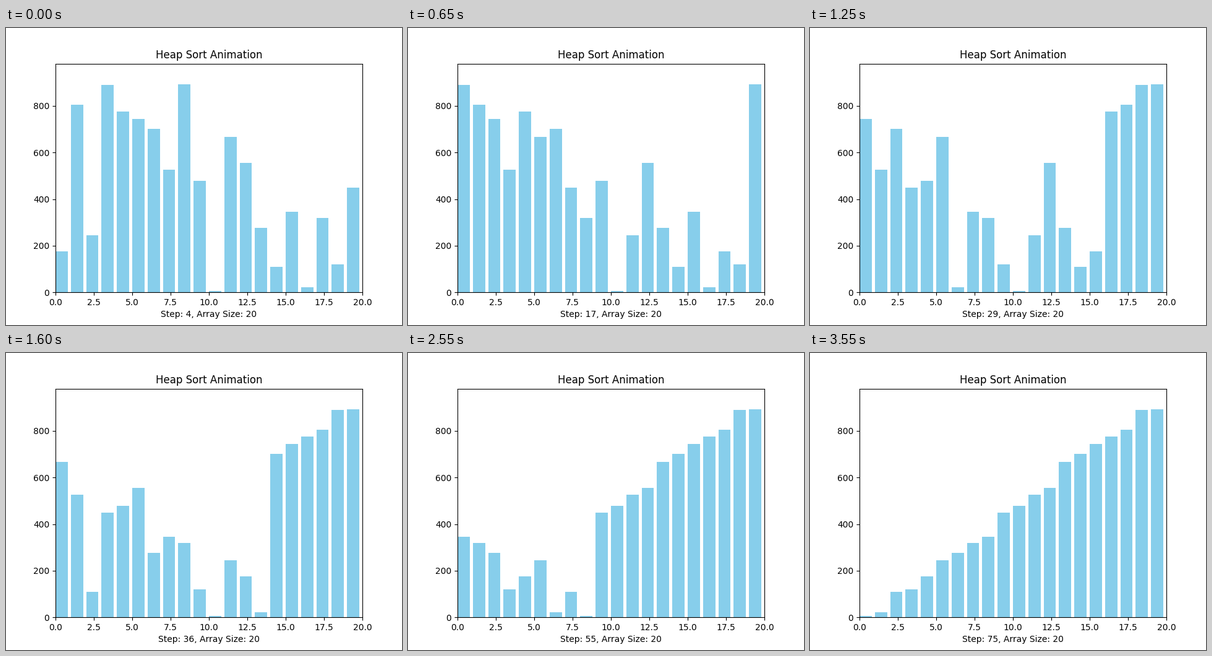
These frames come from a looping animation (640 by 480 pixels, 8 s). A matplotlib script:

```python
import matplotlib.pyplot as plt
from matplotlib.animation import FuncAnimation

VALUES = [175, 805, 244, 890, 776, 744, 702, 527, 892, 478,
          5, 667, 555, 276, 109, 346, 22, 319, 120, 450]
FIRST_STEP = 4
INTERVAL = 50
FRAMES = 160


def sift_down(arr, n, i):
    """Restore the heap below i, yielding after each swap."""
    while True:
        children = [c for c in (2 * i + 1, 2 * i + 2) if c < n]
        largest = max([i] + children, key=lambda k: arr[k])
        if largest == i:
            return
        arr[i], arr[largest] = arr[largest], arr[i]
        yield arr[:]
        i = largest


def heap_sort(values):
    arr = list(values)
    n = len(arr)
    yield arr[:]
    for i in range(n // 2 - 1, -1, -1):
        yield from sift_down(arr, n, i)
    for end in range(n - 1, 0, -1):
        arr[0], arr[end] = arr[end], arr[0]
        yield arr[:]
        yield from sift_down(arr, end, 0)


states = list(heap_sort(VALUES))
size = len(VALUES)

plt.rcParams["font.family"] = "DejaVu Sans"
fig, ax = plt.subplots(figsize=(6.4, 4.8), dpi=100)
bars = ax.bar(range(size), VALUES, align="edge", color="skyblue")
ax.set_xlim(0, size)
ax.set_ylim(0, 1.1 * max(VALUES))
ax.set_title("Heap Sort Animation")
label = ax.set_xlabel("")


def update(frame):
    k = min(frame, len(states) - 1)
    for bar, value in zip(bars, states[k]):
        bar.set_height(value)
    label.set_text(f"Step: {FIRST_STEP + k}, Array Size: {size}")
    return [*bars, label]


anim = FuncAnimation(fig, update, frames=FRAMES, interval=INTERVAL,
                     repeat=True, repeat_delay=0, blit=False)
plt.show()
```
